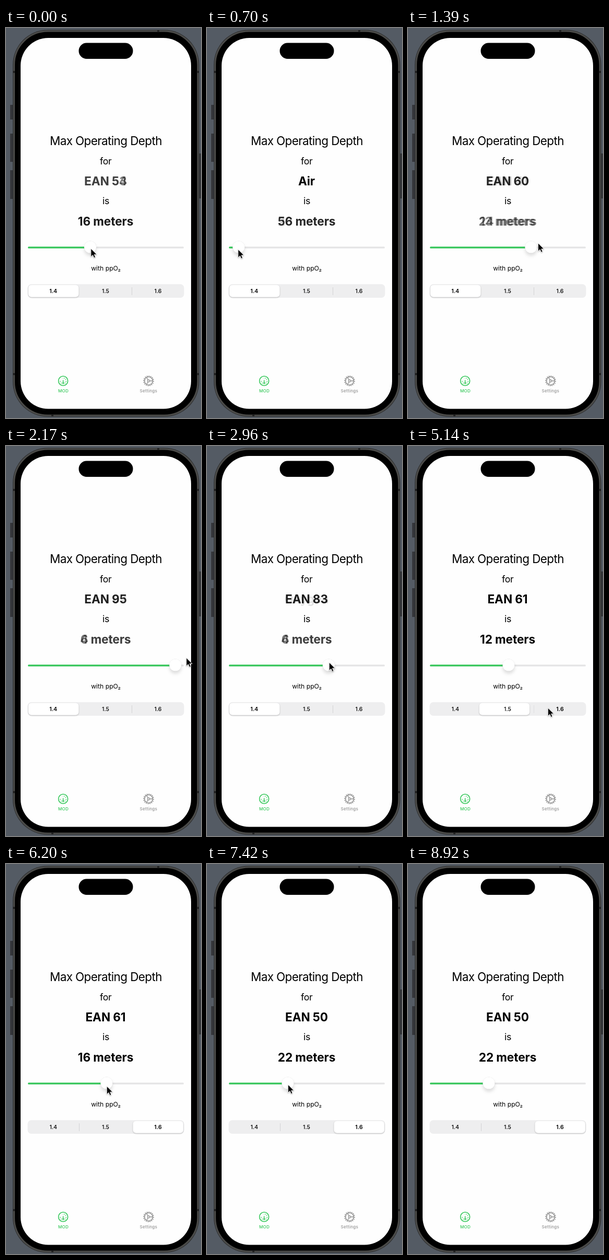
Animation, 374 px wide and 746 px high, one loop 9640 ms. Source, as an HTML page:

```html
<!DOCTYPE html>
<html lang="en">
<head>
<meta charset="utf-8">
<title>Max Operating Depth</title>
<style>
html, body { margin: 0; width: 100%; height: 100%; overflow: hidden; background: #545b64; }
svg { display: block; width: 374px; height: 746px; }
text { font-family: Inter, "Open Sans", sans-serif; font-optical-sizing: none; text-anchor: middle; }
.title { font-size: 22.5px; letter-spacing: -.028em; }
.body { font-size: 17.7px; letter-spacing: -.02em; }
.value { font-size: 22.6px; font-weight: 700; letter-spacing: -.004em; }
.note { font-size: 12.2px; }
.seg text { font-size: 10.6px; }
.tab { font-size: 8.1px; font-weight: 500; letter-spacing: .25px; }
#thumb { filter: drop-shadow(0 5px 3px rgba(0,0,0,.11)) drop-shadow(0 0 .7px rgba(0,0,0,.22)); }
#pill { filter: drop-shadow(0 1px 1.2px rgba(0,0,0,.24)); }
#cursor { filter: drop-shadow(0 1px 1px rgba(0,0,0,.3)); }
</style>
</head>
<body>
<svg viewBox="0 0 374 746">
  <!-- phone -->
  <path d="M8 147h5v28h-5zM8 202h5v54h-5zM8 272h5v55h-5zM370 240h4v86h-4z" fill="#34363a"/>
  <rect x="13" y="3.5" width="357.5" height="740" rx="67" fill="#2b2c2d"/>
  <rect x="15.5" y="6" width="352.5" height="735" rx="64.5" stroke="#4b4b49" stroke-width="3"/>
  <path d="M290 4h4v4h-4zM87 739h4v4h-4zM13 82h4v4h-4zM13 660h4v4h-4zM366 82h4v4h-4zM366 660h4v4h-4z" fill="#222"/>
  <rect x="28" y="19" width="327" height="709.5" rx="53" fill="#fefefe"/>
  <rect x="139.5" y="28.5" width="104" height="30.5" rx="15.2"/>

  <text class="title" x="191.4" y="224.3">Max Operating Depth</text>
  <text class="body" x="191.2" y="260.8">for</text>
  <g class="value" id="gas"><text x="191" y="301"/><text x="191" y="301"/></g>
  <text class="body" x="191.5" y="337.3">is</text>
  <g class="value" id="depth"><text x="191" y="377.8"/><text x="191" y="377.8"/></g>

  <!-- slider -->
  <rect x="42" y="418.3" width="299" height="3.3" rx="1.6" fill="#e4e4e5"/>
  <rect id="fill" x="42" y="418.3" height="3.3" rx="1.6" fill="#34c759"/>
  <circle id="thumb" cy="419" r="11.6" fill="#fff"/>

  <text class="note" x="191.5" y="464">with ppO₂</text>

  <!-- segments -->
  <g class="seg">
    <rect x="41.5" y="490" width="300" height="26" rx="7.2" fill="#eeeeef"/>
    <path id="leftBar" d="M140.5 496v15" stroke="#d3d3d5"/>
    <path id="rightBar" d="M241.5 496v15" stroke="#d3d3d5"/>
    <rect id="pill" y="491.5" width="96.5" height="23.2" rx="6" fill="#fff"/>
    <text id="first" x="90.7" y="506.9">1.4</text>
    <text x="191" y="506.9" font-weight="500">1.5</text>
    <text id="last" x="291.5" y="506.9">1.6</text>
  </g>

  <!-- tabs -->
  <g transform="translate(109.6 675)" fill="none" stroke="#34c759" stroke-linecap="round">
    <circle r="9" stroke-width="1.6"/>
    <path d="M0-1V4" stroke-width="1.5"/>
    <circle cy="4" r="1.1" fill="#34c759"/>
    <circle r="5.6" stroke-width="1.7" pathLength="9" stroke-dasharray=".01 .99" transform="rotate(130)"
      style="clip-path: inset(0 0 2px 0)"/>
  </g>
  <text class="tab" x="110" y="696.8" fill="#34c759">MOD</text>
  <g transform="translate(273.5 675)" fill="none" stroke="#949494">
    <circle r="9.3" stroke-width="2" pathLength="32" stroke-dasharray="1"/>
    <circle r="7.7" stroke-width="1.5"/>
    <circle r="2" stroke-width="1.3"/>
    <path d="M2 0H7.5M-1 1.7L-3.8 6.5M-1-1.7L-3.8-6.5" stroke-width="1.4"/>
  </g>
  <text class="tab" x="273.3" y="696.8" fill="#949494">Settings</text>

  <path id="cursor" d="M0 0V15.6L3.6 12.2 6 17.6 8.6 16.5 6.3 11.2H11.2Z" stroke="#fff" stroke-width=".9"/>
</svg>
<script>
const LOOP = 9640, PICK = 5060;
// The labels take a new reading every FADE ms and cross-fade to it.
const FADE = 260, PHASE = 130, DEPTH_LAG = 100;
const MIN_X = 54, MAX_X = 329;

const $ = id => document.getElementById(id);
const clamp = v => Math.max(0, Math.min(1, v));
const mix = (a, b, p) => a + (b - a) * p;
const easeOut = p => p * (2 - p);

// Eased moves of the pointer; those with a thumb value also drag the slider.
const rest = { x: 163, y: 422, thumb: 164 };
const moves = [
  { from: -390, to: -130, thumb: 169 },
  { from: -130, to: 0, thumb: 162 },
  { from: 0, to: 420, x: 52, y: 424, thumb: MIN_X },
  { from: 680, to: 2380, x: 350, y: 405, thumb: MAX_X },
  { from: 2465, to: 3600, x: 180, y: 418, thumb: 189 },
  { from: 3600, to: 4030, x: 198, y: 419, thumb: 193 },
  { from: 4260, to: 4790, x: 268, y: 501 },
  { from: 5300, to: 5930, x: 193, y: 425 },
  { from: 6200, to: 7000, x: 155, y: 422, thumb: 155 },
  { from: 7740, to: 7950, x: 184, y: 468 },
  { from: 8250, to: 8570, x: 91, y: 623 },
  { from: 8750, to: 8900, x: -20, y: 690 }
];

function stateAt(t) {
  const s = { ...rest };
  for (const { from, to, ...goal } of moves) {
    const p = easeOut(clamp((t - from) / (to - from)));
    for (const key in goal) s[key] = mix(s[key], goal[key], p);
  }
  return s;
}

const oxygen = t => Math.round(mix(21, 100, (stateAt(t).thumb - MIN_X) / (MAX_X - MIN_X)));

function gasLabel(t) {
  const v = oxygen(t);
  return v === 21 ? "Air" : v === 100 ? "Oxygen" : "EAN " + v;
}

function depthLabel(t) {
  const pressure = t < PICK ? 140 : 160;
  return Math.floor((pressure / oxygen(t) - 1) * 10 + 1e-6) + " meters";
}

function showLabel(id, label, t) {
  const turn = (t + PHASE) / FADE, n = Math.floor(turn);
  const reading = i => label(i * FADE - PHASE);
  const [before, after] = $(id).children;
  before.textContent = reading(n - 1);
  after.textContent = reading(n);
  const p = before.textContent === after.textContent ? 1 : turn - n;
  before.style.opacity = 1 - p;
  after.style.opacity = p;
}

function draw(t) {
  const { x, y, thumb } = stateAt(t);
  $("cursor").setAttribute("transform", `translate(${x + .4} ${y})`);
  $("thumb").setAttribute("cx", thumb);
  $("fill").setAttribute("width", thumb - 42);
  showLabel("gas", gasLabel, t);
  showLabel("depth", depthLabel, t - DEPTH_LAG);

  const p = easeOut(clamp((t - PICK) / 300));
  $("pill").setAttribute("x", mix(43, 243.5, p));
  $("leftBar").style.opacity = p;
  $("rightBar").style.opacity = 1 - p;
  $("first").style.fontWeight = t < PICK ? 600 : 500;
  $("last").style.fontWeight = t < PICK ? 500 : 600;
}

const start = performance.now();
function tick() {
  draw((performance.now() - start) % LOOP);
  requestAnimationFrame(tick);
}
tick();
</script>
</body>
</html>
```
